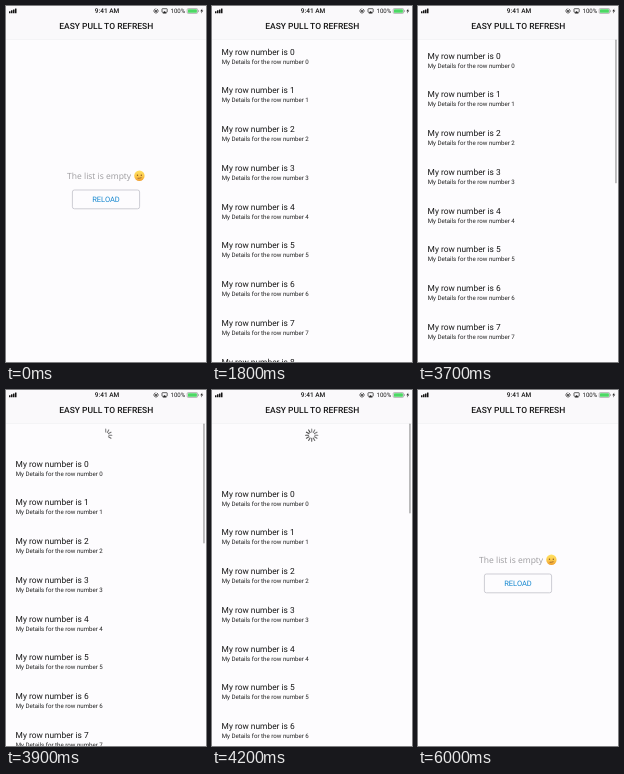
These frames come from a looping animation (200 px wide and 356 px high, 6.7 s). An HTML page with a canvas:

```html
<!DOCTYPE html>
<html lang="en">
<head>
<meta charset="utf-8">
<title>Pull to refresh</title>
<style>
  html, body { margin: 0; width: 100%; height: 100%; overflow: hidden; background: #fdfcfe; }
  canvas { display: block; width: 200px; height: 356px; }
</style>
</head>
<body>
<canvas id="stage"></canvas>
<script>
const W = 200, H = 356, LOOP = 6700, STEP = 100;
const ROW_PITCH = 38.75, NAV_BOTTOM = 33, MAX_PULL = 58;
const PRESS = 1200, LIST = 1800, PULL = 3600, RELEASE = 4300, EMPTY = 4400, SETTLED = 4900;
const SANS = 'Roboto, "Liberation Sans", sans-serif';
const HUMANIST = '"Open Sans", "Noto Sans", sans-serif';

const canvas = document.getElementById('stage');
const ctx = canvas.getContext('2d');
const ratio = window.devicePixelRatio || 1;
canvas.width = W * ratio;
canvas.height = H * ratio;
ctx.scale(ratio, ratio);
if ('textRendering' in ctx) ctx.textRendering = 'geometricPrecision';

const clamp = v => Math.min(1, Math.max(0, v));
const smooth = v => v * v * (3 - 2 * v);

function text(str, x, y, size, { color = '#161616', family = SANS, weight = 400, align = 'left' } = {}) {
  ctx.font = `${weight} ${size}px ${family}`;
  ctx.fillStyle = color;
  ctx.textAlign = align;
  ctx.fillText(str, x, y);
}

function box(x, y, w, h, r, fill, stroke, line = 0.6) {
  ctx.beginPath();
  ctx.roundRect(x, y, w, h, r);
  if (fill) { ctx.fillStyle = fill; ctx.fill(); }
  if (stroke) { ctx.strokeStyle = stroke; ctx.lineWidth = line; ctx.stroke(); }
}

function polygon(points, fill) {
  ctx.beginPath();
  points.forEach(([x, y]) => ctx.lineTo(x, y));
  ctx.closePath();
  ctx.fillStyle = fill;
  ctx.fill();
}

function arc(x, y, r, from = 0, to = Math.PI * 2) {
  ctx.beginPath();
  ctx.arc(x, y, r, from, to);
}

function drawStatusBar() {
  for (let i = 0; i < 4; i++) {
    const h = 2 + i * 0.9;
    box(3 + i * 2, 7.2 - h, 1.5, h, 0.3, '#111');
  }
  text('9:41 AM', 101, 7.2, 6.5, { weight: 500, align: 'center' });

  ctx.strokeStyle = '#222';
  ctx.lineWidth = 0.7;
  arc(150, 4.9, 2.1, -1.2, 4.5);
  ctx.stroke();
  box(149, 4.2, 2, 1.6, 0.3, '#222');

  box(156, 2.7, 5.2, 3.6, 0.5, null, '#222', 0.7);
  polygon([[158.6, 5], [160.6, 7.6], [156.6, 7.6]], '#222');

  text('100%', 164.5, 7.1, 6.1);
  box(181.2, 2.6, 10.4, 4.8, 1, null, '#777', 0.5);
  box(182, 3.3, 8.9, 3.4, 0.5, '#4cd964');
  box(192.2, 4.2, 0.7, 1.6, 0.3, '#777');
  polygon([[196.4, 2.4], [194.3, 5.3], [195.7, 5.3], [195, 7.6], [197.3, 4.6], [195.9, 4.6]], '#222');
}

function drawNav() {
  ctx.fillStyle = '#faf9fb';
  ctx.fillRect(0, 0, W, NAV_BOTTOM);
  ctx.fillStyle = '#ebeaec';
  ctx.fillRect(0, NAV_BOTTOM, W, 0.5);
  drawStatusBar();
  text('EASY PULL TO REFRESH', 100.2, 23.2, 8.5, { weight: 500, align: 'center' });
}

function drawRows(offset) {
  for (let i = 0; i < 9; i++) {
    const y = i * ROW_PITCH + offset;
    text(`My row number is ${i}`, 9.6, y + 48.5, 8.4);
    text(`My Details for the row number ${i}`, 9.7, y + 57.6, 6.15, { color: '#222' });
  }
}

function drawFace(x, y) {
  const skin = ctx.createLinearGradient(0, y - 5, 0, y + 5);
  skin.addColorStop(0, '#ffe063');
  skin.addColorStop(0.5, '#fccb4c');
  skin.addColorStop(1, '#f0a030');
  arc(x, y, 5.2);
  ctx.fillStyle = skin;
  ctx.fill();
  ctx.fillStyle = '#85551f';
  for (const dx of [-1.9, 1.9]) {
    arc(x + dx, y - 0.6, 0.7);
    ctx.fill();
  }
  ctx.strokeStyle = '#96602a';
  ctx.lineWidth = 0.8;
  ctx.beginPath();
  ctx.moveTo(x - 1.8, y + 2.5);
  ctx.quadraticCurveTo(x + 0.3, y + 2.6, x + 2.1, y + 1.8);
  ctx.stroke();
}

function drawEmpty(pressed) {
  text('The list is empty', 61.1, 172.6, 8.5, { family: HUMANIST, color: '#9c9b9e' });
  drawFace(133.4, 169.8);
  box(66.4, 184, 67.2, 18.8, 2, null, '#b9b9c2', 0.7);
  ctx.globalAlpha = pressed ? 0.3 : 1;
  text('RELOAD', 100, 196.2, 7.5, { color: '#1487cf', align: 'center' });
  ctx.globalAlpha = 1;
}

function drawSpinner(count, turn, alpha) {
  ctx.save();
  ctx.translate(99.7, 45.2);
  ctx.lineWidth = 1.1;
  ctx.lineCap = 'round';
  ctx.strokeStyle = '#333';
  for (let i = 0; i < count; i++) {
    const age = (i - turn + 24) % 12;
    const angle = i * Math.PI / 6;
    const sx = Math.sin(angle), sy = -Math.cos(angle);
    ctx.globalAlpha = alpha * (0.6 + 0.3 * age / 11);
    ctx.beginPath();
    ctx.moveTo(sx * 3.2, sy * 3.2);
    ctx.lineTo(sx * 6.1, sy * 6.1);
    ctx.stroke();
  }
  ctx.restore();
}

function drawScrollBar(bottom, alpha) {
  box(197.2, 33.5, 1.5, bottom - 33.5, 0.7, `rgba(0,0,0,${alpha})`);
}

function render(time) {
  const t = Math.floor(time % LOOP / STEP) * STEP;
  const showList = t >= LIST && t < EMPTY;
  const pulling = t >= PULL && t < EMPTY;
  const progress = clamp((t - PULL) / 600);
  const offset = pulling ? 0.4 + (MAX_PULL - 0.4) * smooth(progress ** 1.04) : 0;

  ctx.fillStyle = '#fdfcfe';
  ctx.fillRect(0, 0, W, H);
  if (showList) drawRows(offset);
  else drawEmpty(t >= PRESS && t < LIST);
  drawNav();

  if (pulling) {
    drawScrollBar(181.5 - offset, 0.33);
    drawSpinner(Math.floor(12 * clamp((offset - 10) / 43)), t < RELEASE ? 0 : 1, 1);
  } else if (t >= EMPTY && t < SETTLED) {
    const fade = clamp((SETTLED - t) / 300);
    drawScrollBar(349, 0.02 * fade);
    drawSpinner(12, (t - RELEASE) / STEP + 1, fade);
  }
}

function tick() {
  render(performance.now());
  requestAnimationFrame(tick);
}
tick();
</script>
</body>
</html>
```
